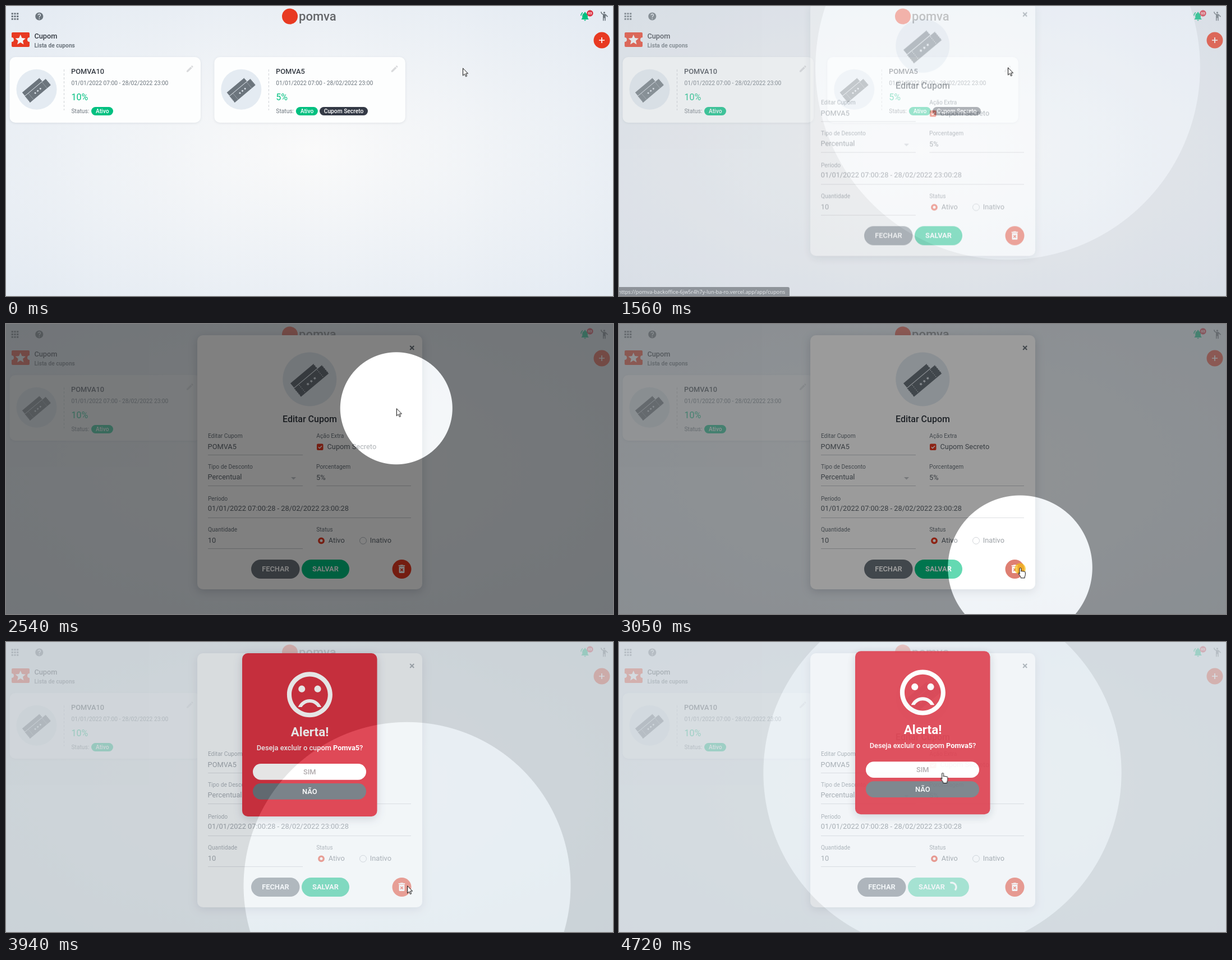
Animation of 1082x517 px, one loop 4.79 s. Source, as an HTML page:

```html
<!DOCTYPE html>
<html lang="pt-BR">
<head>
<meta charset="utf-8">
<title>Cupom</title>
<style>
@property --x { syntax: '<length>'; inherits: true; initial-value: 814px; }
@property --y { syntax: '<length>'; inherits: true; initial-value: 111px; }
@property --r { syntax: '<length>'; inherits: false; initial-value: 100px; }

:root { --red: #e83a22; --green: #00c080; --gray: #6c757d; --ink: #343a42; --mist: #e4ebf2; --loop: 4790ms linear infinite; }
html, body { margin: 0; width: 100%; height: 100%; overflow: hidden; }
body {
  position: relative;
  background: radial-gradient(ellipse farthest-corner at center, #fafafa, #e3eaf2);
  font: 12.8px Roboto, sans-serif;
  animation: move 4790ms ease-in-out infinite;
}
svg { position: absolute; left: 0; top: 0; overflow: visible; }

.small { font-size: 10.24px; fill: var(--gray); }
.bold { font-weight: 700; }
.medium { font-weight: 500; }
.value { fill: #5e666e; }
.title { font-weight: 500; fill: var(--ink); }
.white { fill: #fff; }
.mid { text-anchor: middle; }
.red { fill: var(--red); }
.green { fill: var(--green); }
.gray { fill: var(--gray); }
.rule { stroke: #c9ccd0; fill: none; }
.card { fill: #fdfefe; filter: drop-shadow(0 1px 2px rgba(40, 50, 70, .1)); }
.panel { filter: drop-shadow(0 4px 8px rgba(30, 40, 60, .18)); }
.backdrop { fill: var(--mist); }

#back1 { animation: back1 var(--loop); }
#modal { animation: modalFade var(--loop), modalDrop var(--loop); }
#back2 { animation: back2 var(--loop); }
#alert { animation: alertFade var(--loop), alertDrop var(--loop); }
#status { animation: status var(--loop); }
#idle { animation: idle 4790ms step-end infinite; }
#busy { animation: busy 4790ms step-end infinite; }
#spinner { transform-origin: 593px 437px; animation: spin var(--loop); }
#delete { animation: hover 4790ms step-end infinite; }
#spot {
  position: absolute; inset: 0;
  background: radial-gradient(circle at var(--x) var(--y), #fff calc(var(--r) - .5px), #000 calc(var(--r) + .5px));
  animation: spot var(--loop);
}
#pointer { transform: translate(var(--x), var(--y)); }
#click { animation: click 4790ms step-end infinite; }
#arrow { animation: arrow 4790ms step-end infinite; }
#hand { animation: hand 4790ms step-end infinite; }
.cursor { fill: #fff; stroke: #111; stroke-linejoin: round; }

@keyframes back1 { 0%, 31.11% { opacity: 0 } 33.61%, 100% { opacity: .5 } }
@keyframes back2 { 0%, 66.39% { opacity: 0 } 68.89%, 100% { opacity: .5 } }
@keyframes modalFade { 0%, 31.2% { opacity: 0 } 34.3%, 100% { opacity: 1 } }
@keyframes modalDrop {
  0% { transform: translateY(-50px) }
  30.69% { transform: translateY(-50px); animation-timing-function: ease-out }
  36.95%, 100% { transform: translateY(0) }
}
@keyframes alertFade {
  0%, 66.39% { opacity: 0 }
  69.52%, 98.27% { opacity: 1 }
  98.54% { opacity: .93 }
  100% { opacity: .5 }
}
@keyframes alertDrop {
  0% { transform: translateY(-50px) }
  66.18% { transform: translateY(-50px); animation-timing-function: ease-out }
  72.44%, 98.27% { transform: translateY(0) }
  98.54% { transform: translateY(-3.5px) }
  100% { transform: translateY(-21px) }
}
@keyframes status {
  0%, 27.35% { opacity: 0 }
  28.8%, 31.32% { opacity: 1 }
  33.8%, 100% { opacity: 0 }
}
@keyframes idle { 0% { opacity: 1 } 95.41%, 100% { opacity: 0 } }
@keyframes busy { 0% { opacity: 0 } 95.41%, 100% { opacity: 1 } }
@keyframes spin { from { transform: rotate(-78deg) } to { transform: rotate(2082deg) } }
@keyframes hover { 0% { fill: #e83a22 } 59.71% { fill: #c92d18 } 66.39%, 100% { fill: #e83a22 } }
@keyframes move {
  0%, 17.95% { --x: 814px; --y: 110.5px }
  26.1%, 50.73% { --x: 693px; --y: 109.5px }
  60.13%, 86.64% { --x: 715px; --y: 434.3px }
  93.53%, 100% { --x: 576.5px; --y: 233px }
}
@keyframes spot {
  0%, 12.94% { opacity: 0; --r: 314px }
  12.95% { opacity: .08; --r: 310px }
  14.41% { opacity: .27; --r: 155px }
  16.28% { opacity: .4; --r: 107px }
  18.37%, 29.02% { opacity: .5; --r: 100px }
  30.06% { opacity: .4; --r: 127px }
  31.32% { opacity: .2; --r: 215px }
  32.57% { opacity: .05; --r: 341px }
  33.19% { opacity: 0; --r: 400px }
  45.71% { opacity: 0; --r: 320px }
  45.72% { opacity: .075; --r: 314px }
  47.18% { opacity: .27; --r: 155px }
  49.06% { opacity: .4; --r: 107px }
  51.15%, 62.63% { opacity: .5; --r: 100px }
  63.67% { opacity: .4; --r: 127px }
  64.93% { opacity: .2; --r: 215px }
  66.18% { opacity: .05; --r: 341px }
  66.81% { opacity: 0; --r: 400px }
  82.24% { opacity: 0; --r: 300px }
  82.25% { opacity: .1; --r: 294px }
  83.72% { opacity: .28; --r: 150px }
  85.6% { opacity: .4; --r: 107px }
  87.68%, 94.89% { opacity: .5; --r: 100px }
  96.03% { opacity: .4; --r: 127px }
  97.29% { opacity: .2; --r: 215px }
  98.54% { opacity: .075; --r: 317.5px }
  100% { opacity: 0; --r: 440px }
}
@keyframes click {
  0% { opacity: 0 }
  29.02% { opacity: .7 } 31.3% { opacity: 0 }
  62.42% { opacity: .7 } 65.1% { opacity: 0 }
  94.88% { opacity: .7 } 96.9%, 100% { opacity: 0 }
}
@keyframes arrow {
  0% { opacity: 1 } 25.78% { opacity: 0 } 30.69% { opacity: 1 }
  59.71% { opacity: 0 } 66.39% { opacity: 1 } 91.44%, 100% { opacity: 0 }
}
@keyframes hand {
  0% { opacity: 0 } 25.78% { opacity: 1 } 30.69% { opacity: 0 }
  59.71% { opacity: 1 } 66.39% { opacity: 0 } 91.44%, 100% { opacity: 1 }
}
</style>
</head>
<body>
<svg width="1082" height="517" viewBox="0 0 1082 517">
  <defs>
    <path id="star" d="M0 5.27L6.18 9 4.54 1.97 10-2.76 2.81-3.37 0-10-2.81-3.37-10-2.76-4.54 1.97-6.18 9z"/>
    <g id="ticket">
      <circle r="48" fill="var(--mist)"/>
      <g transform="rotate(-40)" fill="var(--gray)">
        <path d="M-31-16.5H23V-6.5H-31zM-32-5.3H33V14H-32z"/>
        <g stroke="var(--mist)" fill="none">
          <path d="M-32-14.5V13M33-3.5V13M23-14.5V-7" stroke-width="1.8" stroke-linecap="round" stroke-dasharray="0 4"/>
          <path d="M-21-4V13M21-4V13" stroke-width="1" stroke-dasharray="1.6 2"/>
        </g>
        <g fill="var(--mist)">
          <use href="#star" transform="translate(-8 4.4) scale(.28)"/>
          <use href="#star" transform="translate(0 4.4) scale(.28)"/>
          <use href="#star" transform="translate(8 4.4) scale(.28)"/>
        </g>
      </g>
    </g>
    <g id="card">
      <rect class="card" x="6.5" y="91" width="340.5" height="117" rx="10"/>
      <use href="#ticket" transform="translate(54.5 148.7) scale(.75)"/>
      <path d="M103.5 113V186" stroke="#cfd2d6" stroke-dasharray="4 3"/>
      <path transform="translate(320 104.2) scale(.65)" fill="#d9dadc" d="M3 17.25V21h3.75L17.81 9.94l-3.75-3.75L3 17.25zM20.71 7.04c.39-.39.39-1.02 0-1.41l-2.34-2.34c-.39-.39-1.02-.39-1.41 0l-1.83 1.83 3.75 3.75 1.83-1.83z"/>
      <text class="small" x="116.5" y="141">01/01/2022 07:00 - 28/02/2022 23:00</text>
      <text class="small" x="116.5" y="191">Status:</text>
      <rect class="green" x="152" y="180" width="39" height="15" rx="7.5"/>
      <text class="small medium mid" style="fill:#fff" x="171.7" y="191">Ativo</text>
    </g>
  </defs>

  <!-- top bar -->
  <g class="gray">
    <path transform="translate(6.5 9) scale(.79)" d="M4 8h4V4H4v4zm6 12h4v-4h-4v4zm-6 0h4v-4H4v4zm0-6h4v-4H4v4zm6 0h4v-4h-4v4zm6-10v4h4V4h-4zm-6 4h4V4h-4v4zm6 6h4v-4h-4v4zm0 6h4v-4h-4v4z"/>
    <path transform="translate(50.9 10.1) scale(.7)" d="M12 2C6.48 2 2 6.48 2 12s4.48 10 10 10 10-4.48 10-10S17.52 2 12 2zm1 17h-2v-2h2v2zm2.07-7.75l-.9.92C13.45 12.9 13 13.5 13 15h-2v-.5c0-1.1.45-2.1 1.17-2.83l1.24-1.26c.37-.36.59-.86.59-1.41 0-1.1-.9-2-2-2s-2 .9-2 2H8c0-2.21 1.79-4 4-4s4 1.79 4 4c0 .88-.36 1.68-.93 2.25z"/>
    <g transform="translate(1056.8 8.6) scale(.8)">
      <circle cx="12" cy="4" r="2"/>
      <path d="M15.89 8.11C15.5 7.72 14.83 7 13.53 7h-2.54C8.24 6.99 6 4.75 6 2H4c0 3.16 2.11 5.84 5 6.71V22h2v-6h2v6h2V10.05L18.95 14l1.41-1.41-4.47-4.48z"/>
    </g>
  </g>
  <circle class="red" cx="506" cy="18.5" r="14"/>
  <text class="medium" x="522" y="25.5" font-size="22" fill="#646669">pomva</text>
  <path class="green" transform="translate(1022.5 8.8) scale(.8)" d="M7.58 4.08L6.15 2.65C3.75 4.48 2.17 7.3 2.03 10.5h2c.15-2.65 1.51-4.97 3.55-6.42zm12.39 6.42h2c-.15-3.2-1.73-6.02-4.12-7.85l-1.42 1.43c2.02 1.45 3.39 3.77 3.54 6.42zM18 11c0-3.07-1.64-5.64-4.5-6.32V4c0-.83-.67-1.5-1.5-1.5s-1.5.67-1.5 1.5v.68C7.63 5.36 6 7.92 6 11v5l-2 2v1h16v-1l-2-2v-5zm-6 11c.14 0 .27-.01.4-.04.65-.14 1.18-.58 1.44-1.18.1-.24.15-.5.15-.78h-4c.01 1.1.9 2 2.01 2z"/>
  <circle cx="1041" cy="13" r="5.7" fill="#dc3545"/>
  <text class="white bold mid" x="1041" y="15.2" font-size="6">03</text>

  <!-- heading -->
  <path class="red" d="M12 47H40a2 2 0 0 1 2 2V56a4 4 0 0 0 0 8V71a2 2 0 0 1-2 2H12a2 2 0 0 1-2-2V64a4 4 0 0 0 0-8V49a2 2 0 0 1 2-2z"/>
  <use href="#star" transform="translate(25.8 60.2) scale(.92)" fill="#f4f6f8"/>
  <text class="title" x="50.4" y="57.6">Cupom</text>
  <text class="small bold" x="50.4" y="73.6">Lista de cupons</text>
  <circle class="red" cx="1062" cy="61" r="14.5"/>
  <path d="M1057 61H1067M1062 56V66" stroke="#fff" stroke-width="1.7"/>

  <!-- coupons -->
  <use href="#card"/>
  <text class="title" x="116" y="121">POMVA10</text>
  <text class="green" x="116.5" y="167.5" font-size="16">10%</text>
  <use href="#card" x="364.8"/>
  <text class="title" x="481" y="121">POMVA5</text>
  <text class="green" x="481.3" y="167.5" font-size="16">5%</text>
  <rect x="559" y="180" width="86" height="15" rx="7.5" fill="#343a46"/>
  <text class="small medium mid" style="fill:#fff" x="602" y="191">Cupom Secreto</text>

  <rect id="back1" class="backdrop" width="1082" height="517"/>

  <!-- edit form -->
  <g id="modal">
    <rect class="panel white" x="341" y="20" width="401" height="453" rx="10"/>
    <path d="M720.2 39l7 7m0-7l-7 7" stroke="var(--gray)" stroke-width="2"/>
    <use href="#ticket" transform="translate(541.3 98.5)"/>
    <text class="title mid" x="541.5" y="174.6" font-size="16">Editar Cupom</text>
    <g class="small">
      <text x="359.9" y="203">Editar Cupom</text>
      <text x="553.3" y="203">Ação Extra</text>
      <text x="360" y="258">Tipo de Desconto</text>
      <text x="553" y="258">Porcentagem</text>
      <text x="359.9" y="315">Período</text>
      <text x="359.9" y="370">Quantidade</text>
      <text x="553.2" y="370">Status</text>
    </g>
    <g class="value">
      <text x="359.6" y="222.7">POMVA5</text>
      <text x="572.5" y="222.7">Cupom Secreto</text>
      <text x="359.6" y="276.6">Percentual</text>
      <text x="553" y="278">5%</text>
      <text x="359.8" y="333">01/01/2022 07:00:28 - 28/02/2022 23:00:28</text>
      <text x="359.8" y="390">10</text>
      <text x="574.8" y="390">Ativo</text>
      <text x="648.8" y="390">Inativo</text>
    </g>
    <path class="rule" d="M360 233.5H529M360 288.5H529M553.5 288.5H722M360 345.5H722M360 400.5H529"/>
    <path d="M508 273h9l-4.5 4.5z" fill="#c4c7cb"/>
    <rect class="red" x="554" y="213.5" width="11.5" height="11.5" rx="2"/>
    <path d="M556.8 219.3l2.2 2.2 4-4.3" fill="none" stroke="#fff" stroke-width="1.5"/>
    <circle cx="562" cy="386.3" r="4.2" fill="#fff" stroke="var(--red)" stroke-width="3.4"/>
    <circle cx="636.5" cy="386.3" r="6" fill="#fff" stroke="#b3b9bf"/>
    <g id="idle" class="bold mid">
      <rect class="gray" x="437" y="420" width="86.5" height="34" rx="17"/>
      <rect class="green" x="527" y="420" width="85" height="34" rx="17"/>
      <text class="white" x="480.5" y="441.2">FECHAR</text>
      <text class="white" x="569.5" y="441.2">SALVAR</text>
    </g>
    <g id="busy" class="bold mid">
      <rect class="gray" x="425" y="420" width="86.5" height="34" rx="17"/>
      <text class="white" x="468.5" y="441.2">FECHAR</text>
      <g opacity=".65">
        <rect class="green" x="515" y="420" width="109" height="34" rx="17"/>
        <text class="white" x="557.5" y="441.2">SALVAR</text>
        <circle id="spinner" cx="593" cy="437" r="8" fill="none" stroke="#fff" stroke-width="3" stroke-dasharray="21 60"/>
      </g>
    </g>
    <circle id="delete" class="red" cx="705.5" cy="437" r="17"/>
    <path class="white" transform="translate(695.6 426.8) scale(.82)" d="M6 19c0 1.1.9 2 2 2h8c1.1 0 2-.9 2-2V7H6v12zm2.46-7.12l1.41-1.41L12 12.59l2.12-2.12 1.41 1.41L13.41 14l2.12 2.12-1.41 1.41L12 15.41l-2.12 2.12-1.41-1.41L10.59 14l-2.13-2.12zM15.5 4l-1-1h-5l-1 1H5v2h14V4z"/>
  </g>

  <rect id="back2" class="backdrop" width="1082" height="517"/>

  <!-- confirmation -->
  <g id="alert" class="mid">
    <rect class="panel" x="421" y="20" width="240.5" height="291" rx="10" fill="#dc3545"/>
    <g class="white" transform="translate(492.8 45.2) scale(4.05)">
      <circle cx="15.5" cy="9.5" r="1.5"/>
      <circle cx="8.5" cy="9.5" r="1.5"/>
      <path d="M12 14c-2.33 0-4.32 1.45-5.12 3.5h1.67c.69-1.19 1.97-2 3.45-2s2.75.81 3.45 2h1.67c-.8-2.05-2.79-3.5-5.12-3.5zm-.01-12C6.47 2 2 6.48 2 12s4.47 10 9.99 10C17.52 22 22 17.52 22 12S17.52 2 11.99 2zM12 20c-4.42 0-8-3.58-8-8s3.58-8 8-8 8 3.58 8 8-3.58 8-8 8z"/>
    </g>
    <text class="white bold" x="541.5" y="167.5" font-size="22.4">Alerta!</text>
    <text class="white medium" x="541.5" y="193">Deseja excluir o cupom <tspan class="bold">Pomva5</tspan>?</text>
    <rect class="white" x="440" y="217" width="202" height="28.7" rx="14.3"/>
    <text class="medium" x="541.3" y="235.5" fill="#a69fa2">SIM</text>
    <rect class="gray" x="440" y="252" width="202" height="28.7" rx="14.3"/>
    <text class="white medium" x="541.3" y="270.5">NÃO</text>
  </g>

  <!-- link address -->
  <g id="status">
    <rect x="-5" y="501" width="309" height="22" rx="3" fill="#43474d"/>
    <text x="-1.5" y="512.7" fill="#fff" style="font:9.2px 'Open Sans', sans-serif">https://pomva-backoffice-6jw5r4h7y-lun-ba-ro.vercel.app/app/cupons</text>
  </g>
</svg>

<div id="spot"></div>
<svg width="1082" height="517">
  <g id="pointer">
    <circle id="click" cy="2" r="10" fill="#f5bd10"/>
    <path id="arrow" class="cursor" d="M.5.5V13.5L3.5 10.7 5.6 15.2 7.6 14.3 5.6 9.9H9.6z"/>
    <path id="hand" class="cursor" d="M-1 11.5V2a1.5 1.5 0 0 1 3 0V7q.2-1 1.3-1t1.3 1.2q.2-.8 1.3-.8t1.3 1.2q.2-.6 1-.6 1.1 0 1.1 1.4V12.5q0 2-1.1 3.5V18.5H1.2V16.5L-2.6 11.6q-.8-1.4.1-2 .8-.4 1.5.6z"/>
  </g>
</svg>
</body>
</html>
```
